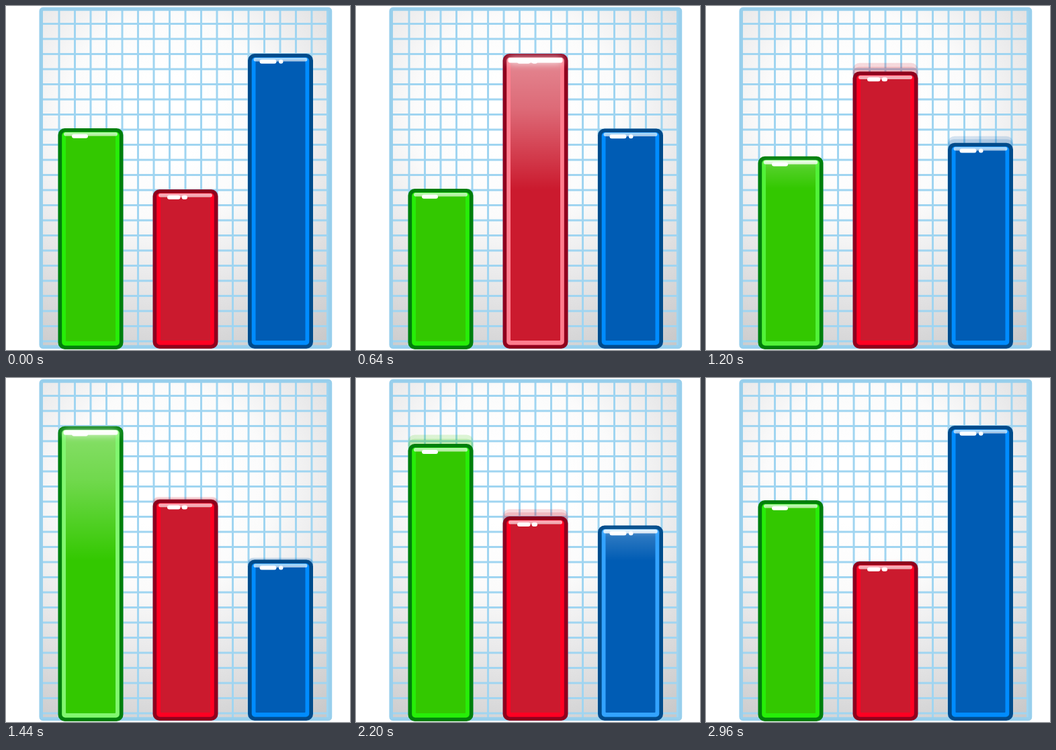
Write an HTML page with a canvas that moves like this. It is 512 px wide and 512 px high and loops after 2.98 s.

```html
<!DOCTYPE html>
<html>
<head>
<meta charset="utf-8">
<style>
html, body { margin: 0; width: 100%; height: 100%; overflow: hidden; background: #fff; }
canvas { display: block; width: 512px; height: 512px; }
</style>
</head>
<body>
<canvas id="stage" width="512" height="512"></canvas>
<script>
const ctx = document.getElementById('stage').getContext('2d');
const LOOP = 2980, STEP = LOOP / 3, MOVE = 530;

// tops: resting top edge in each of the three states; glints: [x offset, width]
const bars = [
  { x: 77.5, bottom: 511, edge: '#007f0b', rim: '#27ee08', fill: '#33c800',
    tops: [182, 272, 68.5], glints: [[20.5, 24]] },
  { x: 218.5, bottom: 510, edge: '#8f001d', rim: '#ff0022', fill: '#cb1a2e',
    tops: [273, 71, 182.5], glints: [[21.5, 19.5], [43, 8.5]] },
  { x: 360, bottom: 510, edge: '#004b8b', rim: '#008cff', fill: '#005cb4',
    tops: [71, 182.5, 272], glints: [[17.5, 25], [46, 6.5]] }
];
const WIDTH = 97;

const clamp = v => Math.min(1, Math.max(0, v));
const white = a => `rgba(255,255,255,${a})`;

function ease(p) {
  const x = clamp(p / MOVE);
  return x < .5 ? 4 * x ** 3 : 1 - 4 * (1 - x) ** 3;
}

function box(x, y, w, h, r, color) {
  ctx.beginPath();
  ctx.roundRect(x, y, w, h, r);
  ctx.fillStyle = color;
  ctx.fill();
}

function drawPaper() {
  const shade = ctx.createRadialGradient(240, 165, 60, 240, 165, 430);
  shade.addColorStop(0, '#fff');
  shade.addColorStop(.25, '#fbfbfb');
  shade.addColorStop(.5, '#e9e9ea');
  shade.addColorStop(1, '#c4c4c5');
  box(50, 2, 435, 508, 5, shade);
  ctx.beginPath();
  for (let x = 79; x < 482; x += 23.5) { ctx.moveTo(x, 4); ctx.lineTo(x, 508); }
  for (let y = 26.5; y < 505; y += 22.5) { ctx.moveTo(52, y); ctx.lineTo(483, y); }
  ctx.strokeStyle = '#a0d5f1';
  ctx.lineWidth = 3;
  ctx.stroke();
  ctx.beginPath();
  ctx.roundRect(52.2, 4.5, 430.3, 503, 3);
  ctx.strokeStyle = '#98cfec';
  ctx.lineWidth = 5.5;
  ctx.stroke();
}

function drawGlow(bar, y, start, glow) {
  const { x, bottom } = bar;
  ctx.save();
  ctx.beginPath();
  ctx.roundRect(x, y, WIDTH, bottom - y, 10);
  ctx.clip();
  // The sheen reaches down to where the rise began
  const sheen = ctx.createLinearGradient(0, y, 0, Math.max(start, y + 1));
  sheen.addColorStop(0, white(glow));
  sheen.addColorStop(.4, white(glow * .72));
  sheen.addColorStop(1, white(0));
  ctx.fillStyle = sheen;
  ctx.fillRect(x + 11.5, y + 6, WIDTH - 23, bottom - y - 18);
  ctx.shadowColor = white(clamp(glow * 2.2));
  ctx.shadowBlur = 5 + 14 * glow;
  box(x + 8, y + 6, WIDTH - 16, 5 + 5 * glow, 3, white(clamp(glow * 2.2)));
  ctx.restore();
}

function drawBar(bar, y, start, glow) {
  const { x, bottom } = bar, h = bottom - y;
  box(x, y, WIDTH, h, 10, bar.edge);
  box(x + 5.7, y + 5.5, WIDTH - 11.4, h - 11, 5, bar.rim);
  if (glow) box(x + 5.7, y + 5.5, WIDTH - 11.4, h - 11, 5, white(glow));
  box(x + 11.5, y + 9, WIDTH - 23, h - 21, 1, bar.fill);
  box(x + 8.5, y + 6, WIDTH - 17, 5.5, 2.7, white(.65));
  if (glow) drawGlow(bar, y, start, glow);
  for (const [dx, w] of bar.glints) box(x + dx, y + 8.8, w, 6, 3, '#fff');
}

function draw(t) {
  const state = Math.floor(t / STEP), p = t - state * STEP;
  const strength = .5 * (p < MOVE ? p / MOVE : clamp(1 - (p - 635) / 240));
  ctx.clearRect(0, 0, 512, 512);
  drawPaper();
  for (const bar of bars) {
    const from = bar.tops[state], to = bar.tops[(state + 1) % 3];
    const topAt = q => from + (to - from) * ease(q);
    const y = topAt(p), rising = to < from;
    if (!rising) {
      ctx.globalAlpha = .16;
      for (const lag of [40, 20]) {
        const trail = topAt(p - lag);
        if (y - trail > .5) box(bar.x, trail, WIDTH, y - trail + 12, 10, bar.fill);
      }
      ctx.globalAlpha = 1;
    }
    drawBar(bar, y, from, rising ? strength : 0);
  }
}

const began = performance.now();
function tick() {
  const t = (performance.now() - began) % LOOP;
  draw(Math.floor(t / 20) * 20);
  requestAnimationFrame(tick);
}
tick();
</script>
</body>
</html>
```
